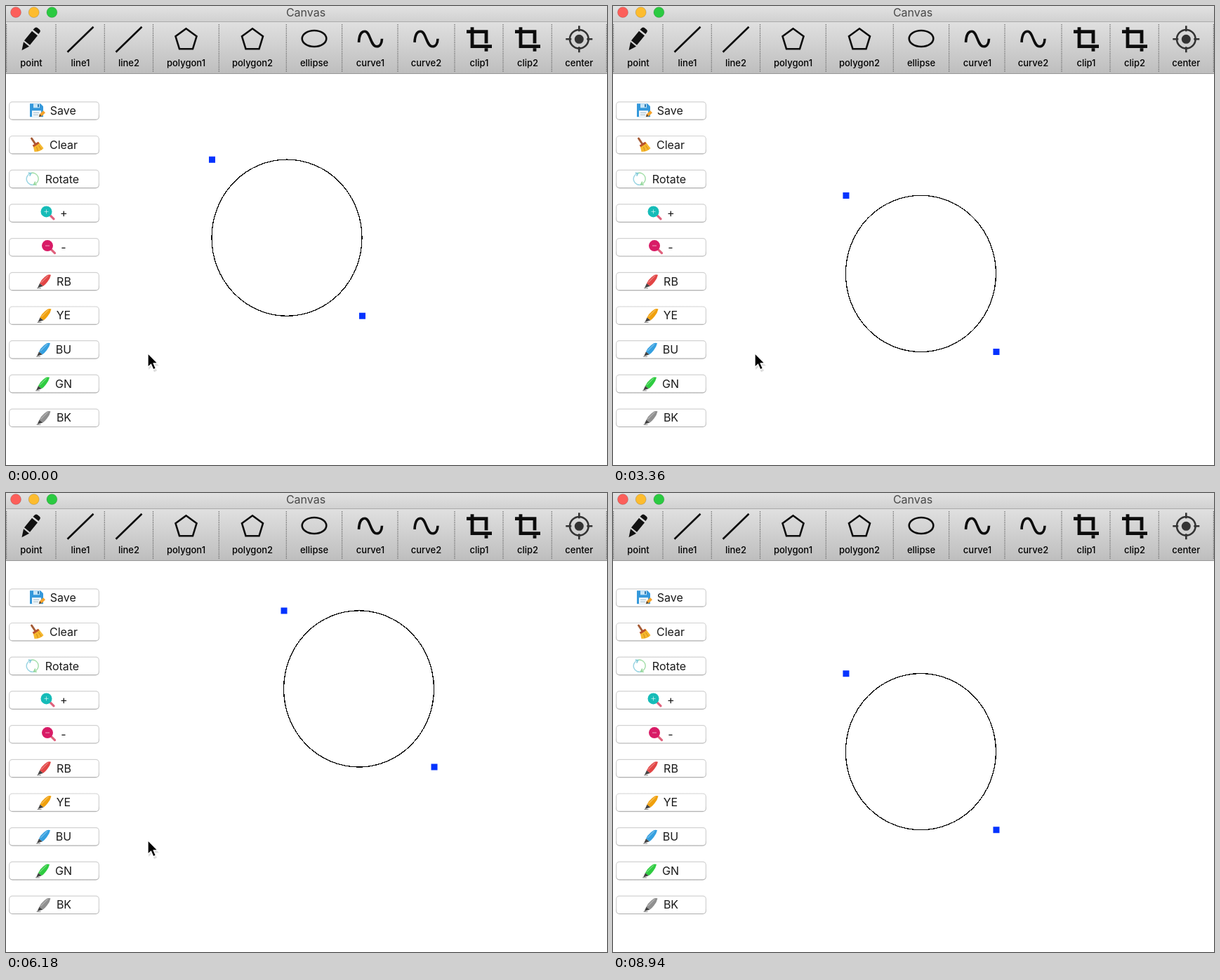
Write an HTML page that moves like this. It is 856 by 655 pixels and loops after 9060 ms.

```html
<!DOCTYPE html>
<html lang="en">
<head>
<meta charset="utf-8">
<title>Canvas</title>
<style>
  html, body { margin: 0; width: 100%; height: 100%; overflow: hidden; background: #fff; }
  svg { display: block; font-family: Inter, Roboto, sans-serif; }
  text { text-anchor: middle; }
  .label { font-size: 13px; font-weight: 500; }
  .button { font-size: 16px; fill: #1a1a1a; }
  .line { fill: none; stroke: #0c0c0c; stroke-width: 2.6; }
</style>
</head>
<body>
<svg width="856" height="655" viewBox="0 0 856 655">
  <defs>
    <linearGradient id="title" x2="0" y2="1"><stop stop-color="#e2e2e2"/><stop offset="1" stop-color="#d0d0d0"/></linearGradient>
    <linearGradient id="bar" x2="0" y2="1"><stop stop-color="#e0e0e0"/><stop offset="1" stop-color="#bebebe"/></linearGradient>
    <linearGradient id="edge" x2="0" y2="1"><stop offset=".7" stop-color="#d2d2d2"/><stop offset="1" stop-color="#b4b4b4"/></linearGradient>

    <path id="point" d="M-13.5 16 L-11 4 L-3 10.5Z M-10 2 L1 -11.5 L9 -5 L-2 8.5Z M2.5 -13.5 L5 -16 Q7 -17.5 9 -16 L12 -13.5 Q13.7 -12 12.4 -10 L10.4 -7.2Z" fill="#111"/>
    <path id="line" class="line" d="M-18.5 18.5 L18.5 -17.5"/>
    <path id="polygon" class="line" d="M0 -15 L15 -4 L9.5 14 H-9.5 L-15 -4Z"/>
    <ellipse id="ellipse" class="line" rx="17.3" ry="11.5" cy="-.8"/>
    <path id="curve" class="line" style="stroke-width:3.6" d="M-16.5 4.5 C-16 -6 -12.5 -11 -8 -11 C0 -11 0 10.5 9 10.5 C13.5 10.5 16.3 6 16.5 -.5"/>
    <path id="clip" class="line" style="stroke-width:4.8" d="M-10 -17 V10.3 H18 M-18 -10.7 H10 V6 M10 13 V17.5"/>
    <g id="center" class="line" style="stroke:#333">
      <circle r="13.3"/><circle r="6.5" fill="#333" stroke="none"/>
      <path d="M0 -19 V-11 M0 19 V11 M-19 0 H-11 M19 0 H11"/>
    </g>

    <g id="save">
      <path d="M-10 -10 H5 L9 -6 V9 H-10Z" fill="#3498db"/>
      <path d="M-5 -10 H4 V-4 H-5Z" fill="#c9e6f7"/><path d="M1 -9 h2 v4 h-2z" fill="#2874ad"/>
      <path d="M-7 0 H6 V9 H-7Z" fill="#f4f8fa"/>
      <path d="M-5 3 H3 M-5 6 H2" stroke="#9bb9cb"/>
      <path d="M3 9 L4 5 L9 0 L12 3 L7 8Z" fill="#f5a32b"/><path d="M3 9 l1 -4 l3 3z" fill="#54443b"/>
    </g>
    <g id="clear">
      <path d="M-7 -9 L-1 0" stroke="#a55b36" stroke-width="3" stroke-linecap="round"/>
      <path d="M-5 1 L3 -4 L10 5 Q6 10 -3 10Z" fill="#f5b82e"/>
      <path d="M-5 2 L3 -3" stroke="#b9502c" stroke-width="3"/>
      <path d="M0 3 L2 9 M3 1 L7 7" stroke="#d58b18"/>
    </g>
    <g id="rotate" fill="none" stroke-width="1.5">
      <path d="M3 8 A8.3 8.3 0 0 1 -3 -7.8" stroke="#9cd5e3"/><path d="M-3 -8 A8.3 8.3 0 0 1 3 7.8" stroke="#a5dfaa"/>
      <path d="M-6 -8.5 l4 .5 l-2 4" stroke="#7fc9d7"/><path d="M6 8.5 l-4 -.5 l2 -4" stroke="#90d596"/>
    </g>
    <g id="zoom"><path d="M4 4 L9 9" stroke-width="3.2" stroke-linecap="round"/><circle cx="-1.5" cy="-1.5" r="8" stroke="none"/></g>
    <g id="pen">
      <path d="M-10 10 H-4" stroke="#888"/>
      <path d="M-9 9.5 L-6 3 L-1 7Z" fill="#444"/>
      <path d="M-6 3 Q-4 -2 1 -6 L5 -9 Q8 -10 10 -9 Q9 -4 5 1 Q2 5 -1 7Z"/>
      <path d="M-4 2 L6 -8" stroke="#fff" stroke-opacity=".3" stroke-width="1.4"/>
    </g>
  </defs>

  <rect width="856" height="655" fill="#fff"/>
  <rect width="856" height="23" fill="url(#title)"/>
  <rect y="23" width="856" height="73" fill="url(#bar)"/>
  <path d="M0 22.5 H856" stroke="#ababab"/>
  <path d="M0 96.5 H856" stroke="#979797"/>
  <g stroke-opacity=".15" stroke="#000">
    <circle cx="14" cy="9" r="7.5" fill="#fc5f5a"/>
    <circle cx="39.7" cy="9" r="7.5" fill="#fdbc2e"/>
    <circle cx="65.4" cy="9" r="7.5" fill="#2bca41"/>
  </g>
  <text x="427" y="15.3" font-size="16" fill="#484848">Canvas</text>
  <g id="tools"></g>
  <g id="buttons"></g>

  <g id="shape">
    <ellipse cx="400" cy="330.7" rx="107" ry="111.6" fill="none" stroke="#000" stroke-width="1.28" shape-rendering="crispEdges"/>
    <path d="M289 214.7 h9 v9 h-9z M503 437.7 h9 v9 h-9z" fill="#0433ff"/>
  </g>
  <g id="cursor">
    <path d="M1 2 V22 L5.5 18 L9 25.500 L13 23.500 L9.700 16.500 H16Z" fill="#000" opacity=".13" transform="translate(0 1.500)"/>
    <path d="M0 0 V20 L4.500 15.900 L7.800 23.300 L11.400 21.700 L8.200 14.500 H14.200Z" fill="#000" stroke="#fff" stroke-width="1.3"/>
  </g>
</svg>
<script>
const $ = id => document.getElementById(id);
const icon = (name, x, y, attrs = '') => `<use href="#${name}" transform="translate(${x} ${y})" ${attrs}/>`;

const tools = [['point', 36], ['line1', 106], ['line2', 175], ['polygon1', 256.5], ['polygon2', 351],
  ['ellipse', 439], ['curve1', 519], ['curve2', 598.5], ['clip1', 674], ['clip2', 743], ['center', 816.3]];
const dividers = [0.6, 71, 140.3, 209.5, 303.3, 399.3, 478.6, 558, 639, 708, 777.3, 855.4];
$('tools').innerHTML =
  tools.map(([name, x]) => icon(name.replace(/\d/, ''), x, 47.3) +
    `<text class="label" x="${x}" y="86">${name}</text>`).join('') +
  `<path d="${dividers.map(x => `M${x} 26V95`).join('')}" stroke="#666" stroke-width="1.2" stroke-dasharray="1.28"/>`;

// label, icon, icon x, colour, text x
const buttons = [
  ['Save', 'save', 44, '', 81.3], ['Clear', 'clear', 43.5, '', 82], ['Rotate', 'rotate', 37.7, '', 80],
  ['+', 'zoom', 59, '#16bcb8', 82.3], ['-', 'zoom', 60.5, '#d81b66', 82],
  ['RB', 'pen', 54, '#e24545', 82.5], ['YE', 'pen', 54.5, '#f0a00c', 82],
  ['BU', 'pen', 53, '#35a0e0', 82], ['GN', 'pen', 52, '#2ecc40', 82], ['BK', 'pen', 53.5, '#8f8f8f', 82.5]];
$('buttons').innerHTML = buttons.map(([label, name, x, colour, textX], i) => {
  const y = 149.3 + i * 48.7;
  let art = icon(name, x, y, colour && `fill="${colour}"`);
  if (name === 'zoom') {
    const sign = label === '+' ? 'M-3 0H3M0 -3V3' : 'M-3 0H3';
    art = icon(name, x, y - .5, `fill="${colour}" stroke="#e0607c"`) +
      `<path d="${sign}" transform="translate(${x - 1.5} ${y - 2})" stroke="#fff" stroke-opacity=".6"/>`;
  }
  return `<rect x="5" y="${y - 12}" width="127" height="26" rx="5" fill="#000" opacity=".08"/>
    <rect x="4.600" y="${y - 12.5}" width="127.800" height="25.400" rx="4.500" fill="#fff" stroke="url(#edge)" stroke-width="1.2"/>
    ${art}<text class="button" x="${textX}" y="${y + 5.8}">${label}</text>`;
}).join('');

// Key presses and repeats: start, interval, count, dx, dy
const runs = [
  [240, 75, 1, 0, -1], [540, 75, 1, 0, 1], [840, 75, 4, 0, 1],
  [1260, 75, 1, 1, 0], [1740, 73, 10, 1, 0],
  [2640, 75, 1, -1, 0], [2880, 75, 15, -1, 0],
  [4020, 75, 1, 0, -1], [4380, 75, 7, 0, -1],
  [4920, 75, 1, 1, 0], [5280, 75, 1, 1, 0], [5400, 76, 14, 1, 0],
  [6480, 75, 1, 0, 1], [6900, 72, 6, 0, 1],
  [7620, 75, 1, -1, 0], [7980, 75, 7, -1, 0]];
const LOOP = 9060, TICK = 60, STEP = 12.815;

function draw() {
  const t = Math.floor(performance.now() % LOOP / TICK) * TICK;
  let x = 0, y = 0;
  for (const [start, gap, count, dx, dy] of runs) {
    if (t < start) break;
    const n = Math.min(count, Math.floor((t - start) / gap) + 1);
    x += n * dx;
    y += n * dy;
  }
  $('shape').setAttribute('transform', `translate(${x * STEP} ${y * STEP})`);

  // The pointer leaves through the bottom edge.
  const leave = Math.max(0, (t - 8640) / 300);
  $('cursor').setAttribute('transform', `translate(202 ${495.5 + 165 * leave ** 1.5})`);
  requestAnimationFrame(draw);
}
draw();
</script>
</body>
</html>
```
